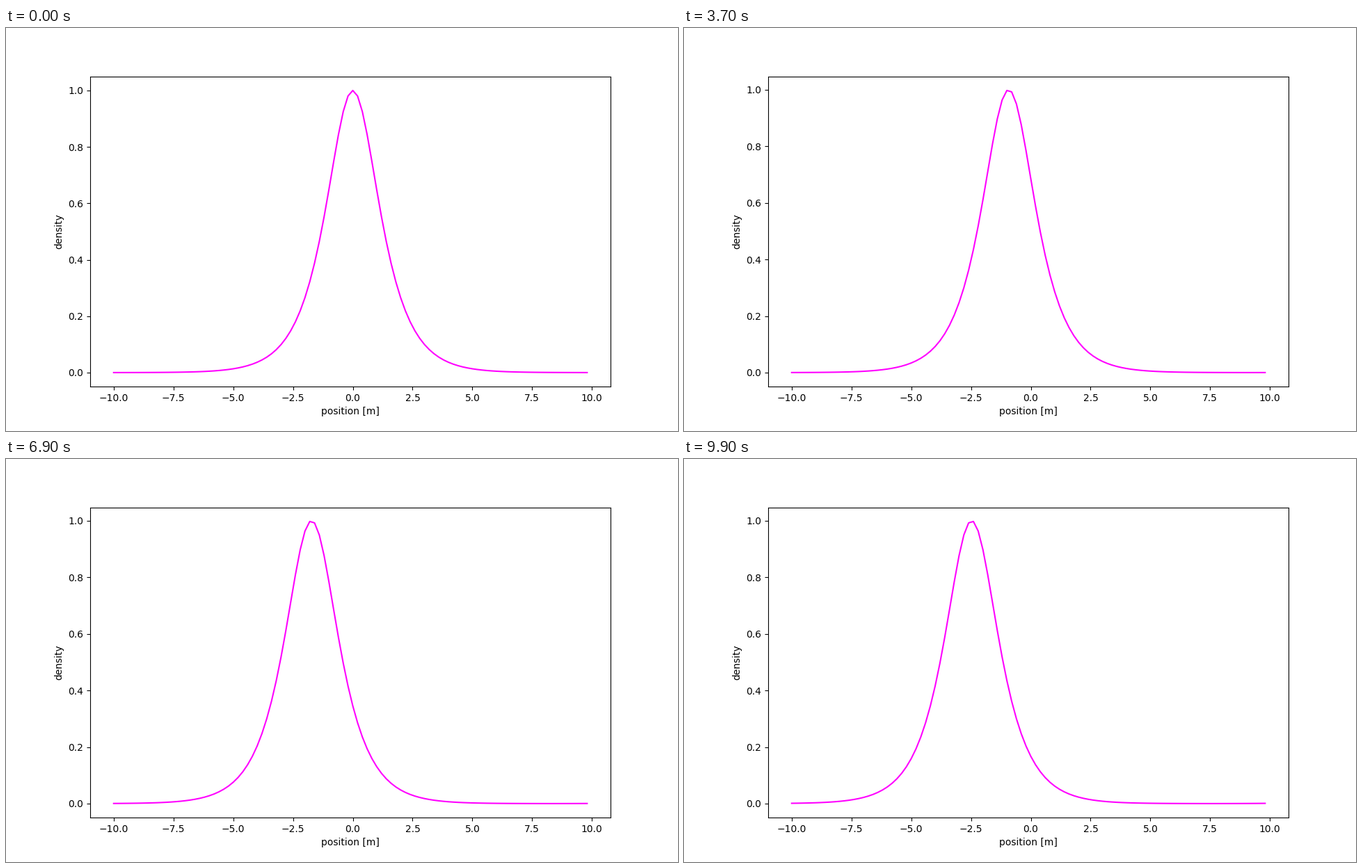
Recreate the animation shown at these times as a matplotlib script. Size 966x580 px, loop 10000 ms.

```python
import numpy as np
import matplotlib.pyplot as plt
from matplotlib.animation import FuncAnimation

FRAMES = 100
INTERVAL = 100   # ms
LENGTH = 20.0    # periodic domain, m
STEP = 0.025     # leftward shift per frame, m

plt.rcParams["font.family"] = "DejaVu Sans"

x = -LENGTH / 2 + LENGTH / 100 * np.arange(100)


def density(shift):
    """Sech pulse moved left by shift, wrapped around the domain."""
    d = (x + shift + LENGTH / 2) % LENGTH - LENGTH / 2
    return 1 / np.cosh(d)


fig, ax = plt.subplots(figsize=(9.66, 5.8), dpi=100)
line, = ax.plot(x, density(0), color="magenta", lw=1.5)
ax.set_xlabel("position [m]")
ax.set_ylabel("density")


def update(i):
    line.set_ydata(density(STEP * i))
    # the view follows the sampled peak
    ax.relim()
    ax.autoscale_view()
    return line,


anim = FuncAnimation(fig, update, frames=FRAMES, interval=INTERVAL,
                     repeat=True, repeat_delay=0, blit=False)
plt.show()
```
